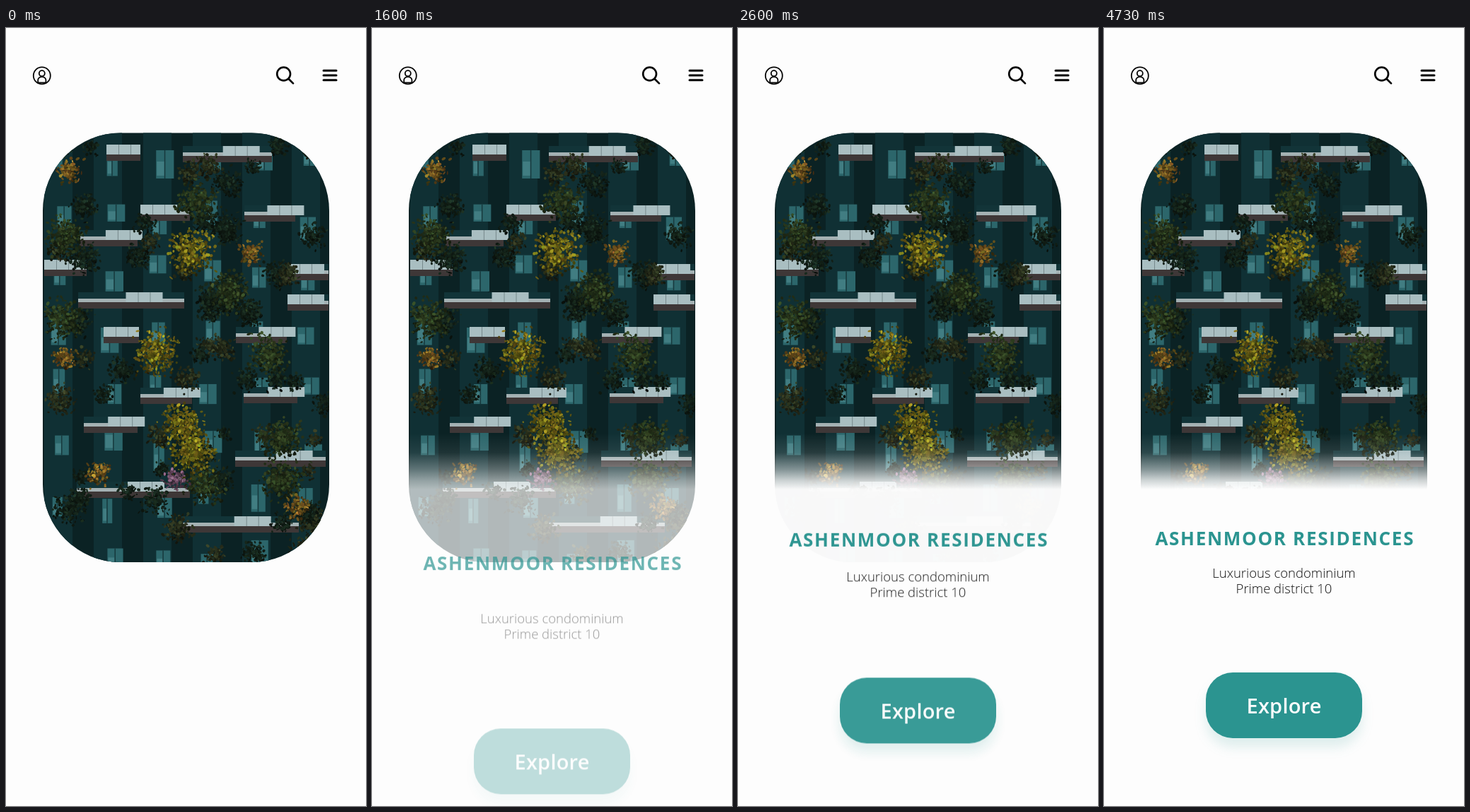
Write an HTML page with a canvas that moves like this. It is 509 px wide and 1101 px high and loops after 4760 ms.

```html
<!DOCTYPE html>
<html lang="en">
<head>
<meta charset="utf-8">
<title>Residences</title>
<style>
  html, body { margin: 0; width: 100%; height: 100%; overflow: hidden; background: #fdfdfd; }
  canvas, svg { position: absolute; left: 0; top: 0; width: 509px; height: 1101px; }
  text { font-family: "Open Sans", "Noto Sans", sans-serif; text-anchor: middle; }
  .icon { fill: none; stroke: #050505; stroke-linecap: round; }
  #title { font-size: 26px; font-weight: 700; letter-spacing: 1.7px; fill: #2b9490; }
  #info { font-size: 18.5px; font-weight: 300; fill: #111; }
  #button rect { fill: #2b9490; filter: drop-shadow(0 13px 8px rgba(43, 148, 144, .14)); }
  #button text { font-size: 29px; font-weight: 600; fill: #fdfdfd; letter-spacing: .2px; }
</style>
</head>
<body>
<canvas id="photo" width="509" height="1101"></canvas>
<svg viewBox="0 0 509 1101">
  <defs>
    <linearGradient id="mist" x1="0" y1="0" x2="0" y2="1">
      <stop offset="0" stop-color="#fdfdfd" stop-opacity="0"/>
      <stop offset=".15" stop-color="#fdfdfd" stop-opacity=".12"/>
      <stop offset=".28" stop-color="#fdfdfd" stop-opacity=".5"/>
      <stop offset=".36" stop-color="#fdfdfd" stop-opacity=".8"/>
      <stop offset=".43" stop-color="#fdfdfd"/>
    </linearGradient>
  </defs>
  <g class="icon" stroke-width="1.8">
    <circle cx="50.8" cy="67.4" r="12"/>
    <circle cx="50.8" cy="64.2" r="4"/>
    <path d="M45.2 77.4V73.6a5.6 4.6 0 0 1 11.2 0V77.4Z"/>
  </g>
  <g class="icon" stroke-width="2.7">
    <circle cx="392.6" cy="65" r="9.4"/>
    <path d="M399.6 72 406 78.4"/>
  </g>
  <path class="icon" stroke-width="3" d="M449 60.2h18M449 67h18M449 73.8h18"/>

  <rect id="fog" x="50" y="573" width="409" height="186" fill="url(#mist)"/>
  <text id="title" x="255.8" y="732">ASHENMOOR RESIDENCES</text>
  <g id="info">
    <text x="254.5" y="777.5">Luxurious condominium</text>
    <text x="254.5" y="799.5">Prime district 10</text>
  </g>
  <g id="button">
    <rect x="144" y="912" width="221" height="93" rx="38"/>
    <text x="254.6" y="969.5">Explore</text>
  </g>
</svg>
<script>
const ctx = document.getElementById("photo").getContext("2d");

let seed = 11;
const rnd = () => (seed = (seed * 16807) % 2147483647) / 2147483647;
const spread = () => rnd() + rnd() + rnd() - 1.5;

function box(color, x, y, w, h) {
  ctx.fillStyle = color;
  ctx.fillRect(x, y, w, h);
}

function pane(x, y, w, h) {
  box("#2c666b", x, y, w, h);
  box("#417d82", x + 1, y + h * .4, w / 2 - 2, h * .5);
  box("#17393d", x + w / 2 - 1, y, 1.5, h);
}

function balcony(x, y, w) {
  box("#123438", x, y - 14, w, 14);
  box("#a4b1b3", x, y - 5, w, 5);
  box("#3e3737", x, y, w, 9);
  const start = w > 70 ? x + w * .45 : x;
  box("#a9bec1", start, y - 14, Math.min(w, 52), 14);
  for (let k = 17; k < 50; k += 17) box("#77898c", start + k, y - 14, 1, 14);
}

function tree(x, y, r, hue, sat, lit) {
  const leaves = r * r * .45;
  for (let i = 0; i < leaves; i++) {
    const dx = spread() * r * .95, dy = spread() * r * .95;
    const light = lit * (.35 + .9 * i / leaves * rnd() + .25 * rnd() - .12 * dy / r);
    ctx.fillStyle = `hsl(${hue + spread() * 10},${sat}%,${light}%)`;
    ctx.beginPath();
    ctx.ellipse(x + dx, y + dy, 1 + rnd() * 2.2, .8 + rnd() * 1.6, rnd() * 3, 0, 7);
    ctx.fill();
  }
}

// x, y, width
const balconies = [
  [142, 179, 48], [250, 181, 126], [190, 264, 70], [337, 265, 72],
  [104, 300, 82], [54, 342, 60], [398, 348, 58], [102, 388, 150],
  [398, 391, 58], [138, 437, 50], [325, 437, 72], [190, 523, 73],
  [336, 522, 76], [110, 564, 76], [324, 612, 128], [100, 656, 160],
  [248, 705, 166]
];

const green = [[270, 245], [85, 295], [315, 375], [80, 412], [370, 463], [390, 582], [390, 640], [280, 645]];
const yellow = [[262, 318], [213, 461], [250, 565], [265, 602]];
const amber = [[90, 203], [345, 318], [82, 467], [130, 632], [412, 678]];

function drawPhoto() {
  ctx.beginPath();
  ctx.roundRect(52, 148.5, 405, 607.5, 110);
  ctx.save();
  ctx.clip();
  box("#0b2224", 52, 148, 406, 609);
  for (let x = 62; x < 457; x += 70) {
    box("#103034", x - 8, 148, 40, 609);
    for (let y = 160; y < 750; y += 80) pane(x + rnd() * 12, y + rnd() * 30, 14 + rnd() * 12, 24 + rnd() * 16);
  }
  balconies.forEach(b => balcony(...b));
  for (let i = 0; i < 64; i++) {
    const tone = i % 3 ? [140, 27, 13] : [80, 26, 17];
    tree(60 + rnd() * 390, 155 + rnd() * 595, 10 + rnd() * 11, ...tone);
  }
  green.forEach(([x, y]) => tree(x, y, 26, 92, 33, 19));
  yellow.forEach(([x, y]) => tree(x, y, 28, 54, 66, 30));
  amber.forEach(([x, y]) => tree(x, y, 16, 40, 58, 34));
  tree(240, 640, 15, 318, 18, 42);
  ctx.restore();
  ctx.strokeStyle = "rgba(150,160,160,.55)";
  ctx.stroke();
}

const LOOP = 4760, RISE = 2400, SHIFT = 113;

function reveal(id, start, shift) {
  const off = { opacity: 0, transform: `translateY(${shift}px)` };
  const on = { opacity: 1, transform: "translateY(0px)" };
  document.getElementById(id).animate([
    { ...off, offset: 0 },
    { ...off, offset: start / LOOP, easing: "cubic-bezier(.25,1,.5,1)" },
    { ...on, offset: (start + RISE) / LOOP },
    { ...on, offset: 1 }
  ], { duration: LOOP, iterations: Infinity });
}

drawPhoto();
reveal("fog", 1000, 0);
reveal("title", 1000, SHIFT);
reveal("info", 1290, SHIFT);
reveal("button", 1400, SHIFT);
</script>
</body>
</html>
```
